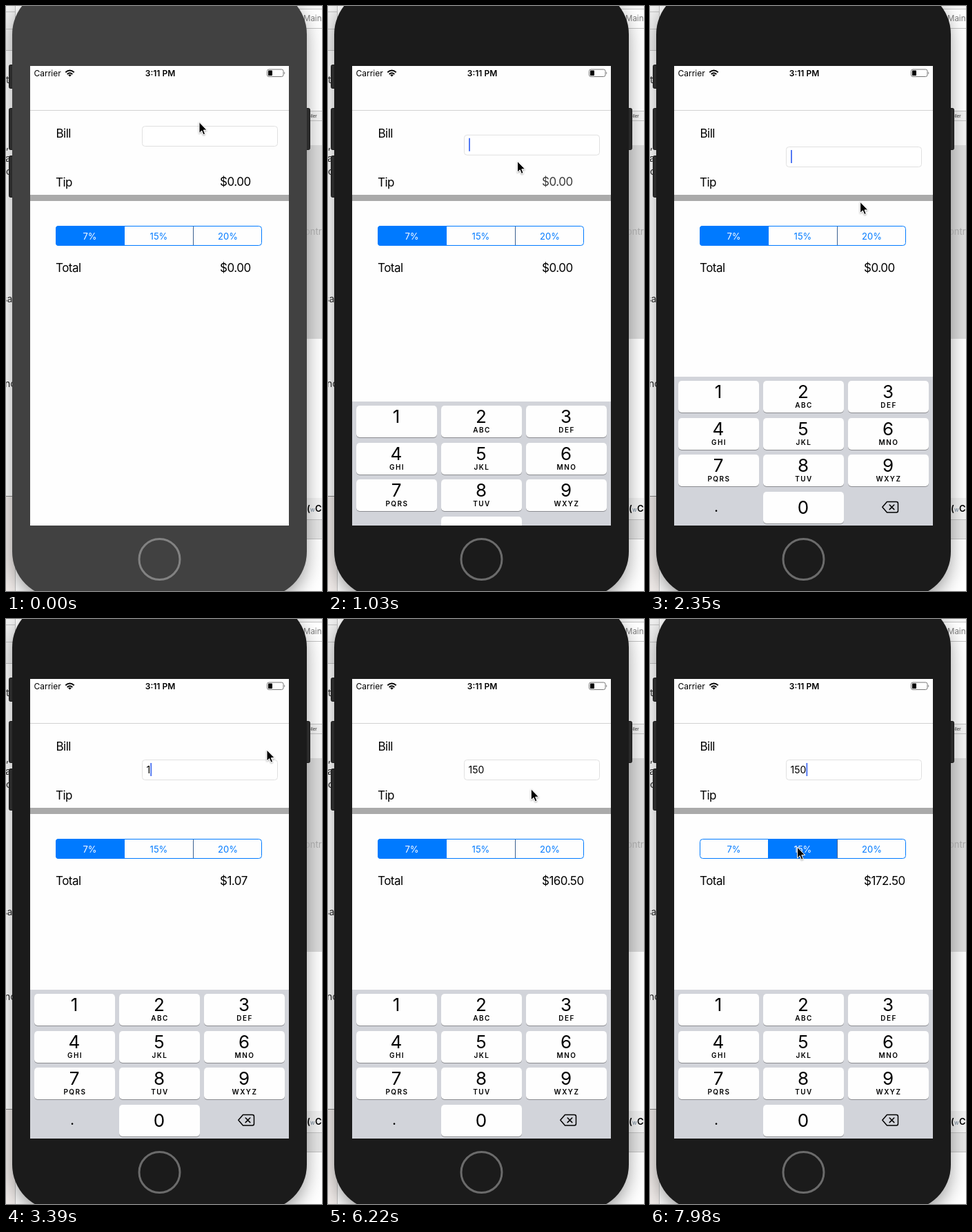
An HTML page that plays this animation: 458x849 px, repeating every 8 s.

```html
<!DOCTYPE html>
<html>
<head>
<meta charset="utf-8">
<style>
  html, body { margin: 0; width: 100%; height: 100%; overflow: hidden; background: #fff; }
  svg { display: block; font-family: Inter, Roboto, sans-serif; }
  .label { font-size: 17px; letter-spacing: -.5px; }
  .seg { font-size: 13px; text-anchor: middle; fill: #007aff; }
  .digit { font-size: 26px; text-anchor: middle; }
  .letters { font-size: 10px; font-weight: 600; letter-spacing: 1.5px; text-anchor: middle; }
  .side { font-size: 14px; fill: #222; }
</style>
</head>
<body>
<svg width="458" height="849" viewBox="0 0 458 849">
  <defs>
    <clipPath id="screen"><path d="M35 87H410V754H35Z"/></clipPath>
    <filter id="soft" x="-20%" y="-20%" width="140%" height="140%"><feGaussianBlur stdDeviation="14"/></filter>
    <filter id="drop" x="-50%" y="-50%" width="200%" height="200%">
      <feDropShadow dx="0" dy="1" stdDeviation="1" flood-opacity=".4"/>
    </filter>
  </defs>

  <!-- windows behind the phone -->
  <path fill="#fff" d="M0 0H458V849H0Z"/>
  <path fill="#f1f1f1" d="M0 0H14V64H0Z"/>
  <path fill="#f0ebe9" d="M0 712H14V849H0Z"/>
  <path fill="#f4f4f4" d="M420 0H458V4H420ZM420 152H458V202H420Z"/>
  <path fill="#dcdcdc" d="M420 202H458V483H420Z"/>
  <path fill="#f3f3f3" d="M420 714H458V745H420Z"/>
  <path fill="#e6e6e6" d="M420 745H458V773H420Z"/>
  <path stroke="#c4c4c4" fill="none" d="M0 8.500H13M0 33.500H13M0 64.500H13M13.500 0V849M420 4.500H458M420 32.500H458M420 152.500H458M420 166.500H458M420 745.500H458M420 773.500H458"/>
  <path stroke="#888" d="M0 711.500H13"/>
  <rect x="11" y="-15" width="423" height="883" rx="66" opacity=".42" filter="url(#soft)"/>
  <text x="431" y="22" font-size="11.500" fill="#777">Main.</text>
  <text x="438" y="162" font-size="6" font-weight="600" fill="#555">oller</text>
  <text x="433" y="332" font-size="13" fill="#a5a5a5">ontr</text>
  <text x="436" y="734" font-size="13" font-weight="600">(</text>
  <text x="441" y="734" font-size="8" fill="#678">w</text>
  <text x="448" y="734" font-size="13" font-weight="600">C</text>
  <g class="side">
    <text x="0" y="112">t</text><text x="0" y="207">,</text><text x="-1" y="226">a</text>
    <text x="0" y="245">c</text><text x="-6" y="430">sa</text><text x="-2" y="553">no</text>
  </g>

  <!-- phone -->
  <g fill="#2b2b2b" stroke="#1a1a1a">
    <rect x="4.500" y="85.500" width="9" height="34" rx="2"/>
    <rect x="4.500" y="148.500" width="9" height="60" rx="2"/>
    <rect x="4.500" y="217.500" width="9" height="60" rx="2"/>
    <rect x="431.500" y="148.500" width="9" height="60" rx="2"/>
  </g>
  <rect id="body" x="9" y="-25" width="427" height="883" rx="66"/>
  <circle id="home" cx="222.500" cy="803" r="29.500" fill="none" stroke-width="3"/>
  <path fill="#fefefe" d="M35 87H410V754H35Z"/>

  <!-- status bar -->
  <text x="40.500" y="101.500" font-size="12">Carrier</text>
  <g fill="none" stroke="#000" stroke-width="2">
    <path d="M86.300 96.300Q92.500 90.700 98.700 96.300M88.700 98.900Q92.500 95.500 96.300 98.900"/>
    <path fill="#000" stroke="none" d="M90.200 100.300Q92.500 98.400 94.800 100.300L92.500 102.600Z"/>
  </g>
  <text x="223.500" y="101.500" font-size="12" font-weight="600" text-anchor="middle">3:11 PM</text>
  <rect x="378.500" y="92" width="23.500" height="10.500" rx="2.500" fill="none" stroke="#777"/>
  <rect x="380" y="93.500" width="6" height="7.500" rx=".8"/>
  <path fill="#777" d="M403.300 95.300Q405.300 97.200 403.300 99.200Z"/>
  <path stroke="#d2d2d2" d="M35 151.500H410"/>

  <!-- form -->
  <g class="label">
    <text x="72.500" y="190.500">Bill</text>
    <text x="72" y="261.500">Tip</text>
    <text x="72" y="385.500">Total</text>
    <text id="tip" x="310" y="260.500">$0.00</text>
    <text id="total" x="310" y="385.500"></text>
  </g>
  <path fill="#aaa" d="M35 274H410V283H35Z"/>
  <g id="field">
    <rect x="197.500" y="174.500" width="196" height="29" rx="4" fill="#fff" stroke="#e0e0e0"/>
    <text id="bill" x="203.500" y="194" font-size="14"></text>
    <rect id="caret" y="179" width="2" height="19" fill="#426bf2"/>
  </g>
  <path id="pick" fill="#007aff"/>
  <path stroke="#3a6090" d="M271.500 320V347"/>
  <path stroke="#007aff" d="M171.500 320V347"/>
  <rect x="72.500" y="319.500" width="298" height="28" rx="4" fill="none" stroke="#007aff"/>
  <text class="seg" x="121.500" y="338.500">7%</text>
  <text class="seg" x="221.500" y="338.500">15%</text>
  <text class="seg" x="321.500" y="338.500">20%</text>

  <g clip-path="url(#screen)">
    <g id="keys">
      <path fill="#d2d4da" d="M35 538H410V754H35Z"/>
      <text x="96" y="734" class="digit" style="font-size:21px">.</text>
      <path fill="none" stroke="#000" stroke-width="1.500" stroke-linejoin="round" stroke-linecap="round"
        d="M343.500 719.500H357Q359.500 719.500 359.500 722V732.500Q359.500 735 357 735H343.500L336.800 727.300ZM347.200 724L353.800 730.600M353.800 724L347.200 730.600"/>
    </g>
  </g>
  <path id="cursor" d="M0 0V16L3.700 12.600L6 18.200L8.600 17.100L6.300 11.600H11.200Z" stroke="#fff" stroke-width="1" filter="url(#drop)"/>
</svg>
<script>
const $ = id => document.getElementById(id);
const segs = document.querySelectorAll('.seg');

// The picture is refreshed only at these moments (ms).
const ticks = [0, 150, 300, 440, 590, 880, 1030, 1170, 1320, 1470, 1610, 1760, 1900,
  2350, 2500, 2650, 2800, 2950, 3390, 3990, 4140, 4430, 4730, 4880, 5030, 5330, 5480,
  6070, 6220, 6370, 6510, 6660, 6810, 6960, 7110, 7250, 7400, 7540, 7690, 7840, 7980];

// Pointer path: time, x, y
const path = [[0, 280, 168.5], [590, 264, 195], [860, 264, 195], [1320, 298, 293],
  [2220, 298, 293], [2950, 378, 190], [4600, 378, 190], [4850, 348, 226], [5030, 342, 221],
  [5950, 342, 221], [6760, 158, 320], [7110, 182, 317.5], [7690, 213.5, 331], [8000, 213.5, 331]];

// Typing: time, text, total
const typed = [[0, '', '$0.00'], [3390, '1', '$1.07'], [5330, '15', '$16.05'], [5480, '150', '$160.50']];
const FOCUS = 880, PICK = 7690;

const clamp = v => Math.max(0, Math.min(1, v));
const ease = v => v * v * (3 - 2 * v);

function pointer(t) {
  const i = path.findIndex(p => p[0] > t);
  const [t0, x0, y0] = path[i - 1], [t1, x1, y1] = path[i];
  const k = ease((t - t0) / (t1 - t0));
  return [x0 + (x1 - x0) * k, y0 + (y1 - y0) * k];
}

function buildKeys() {
  const letters = ['', 'ABC', 'DEF', 'GHI', 'JKL', 'MNO', 'PQRS', 'TUV', 'WXYZ'];
  let out = '';
  const key = (x, y, digit, sub, base) => {
    out += `<rect x="${x}" y="${y + 1}" width="117" height="46" rx="5" fill="#8b8c90"/>
      <rect x="${x}" y="${y}" width="117" height="46" rx="5" fill="#fefefe"/>
      <text class="digit" x="${x + 58}" y="${y + base}">${digit}</text>
      <text class="letters" x="${x + 59}" y="${y + 39}">${sub}</text>`;
  };
  letters.forEach((sub, i) =>
    key(41 + i % 3 * 123, 544 + Math.round(Math.floor(i / 3) * 53.6), i + 1, sub, 25));
  key(164, 705, 0, '', 32);
  $('keys').insertAdjacentHTML('beforeend', out);
}

function draw(t) {
  const dim = clamp(t / 590);
  const grey = v => `rgb(${v},${v},${v})`;
  $('body').setAttribute('fill', grey(Math.round(65 - 38 * dim)));
  $('home').setAttribute('stroke', grey(Math.round(130 - 23 * dim)));

  const slide = clamp((t - 850) / 400);
  $('keys').setAttribute('transform', `translate(0 ${216 * (1 - slide) ** 3})`);
  $('field').setAttribute('transform', `translate(0 ${30 * ease(slide)})`);
  $('tip').setAttribute('opacity', 1 - clamp((t - 850) / 790));

  const [at, bill, total] = typed.findLast(e => e[0] <= t);
  const picked = t >= PICK ? 1 : 0;
  $('bill').textContent = bill;
  $('total').textContent = picked ? '$172.50' : total;

  const phase = (t - Math.max(at, FOCUS)) % 1000;
  $('caret').setAttribute('x', 204 + (bill ? $('bill').getComputedTextLength() - .5 : 0));
  $('caret').setAttribute('opacity', t < FOCUS ? 0 : phase < 580 ? .9 : phase < 635 ? .25 : 0);

  $('pick').setAttribute('d', picked ? 'M171 320H272V347H171Z'
    : 'M172 319V348H76Q72 348 72 344V323Q72 319 76 319Z');
  segs.forEach((s, i) => s.style.fill = i === picked ? '#fff' : '#007aff');

  $('cursor').setAttribute('transform', `translate(${pointer(t)})`);
}

function frame() {
  const now = performance.now() % 8000;
  draw(ticks.findLast(t => t <= now));
  requestAnimationFrame(frame);
}

buildKeys();
frame();
</script>
</body>
</html>
```
